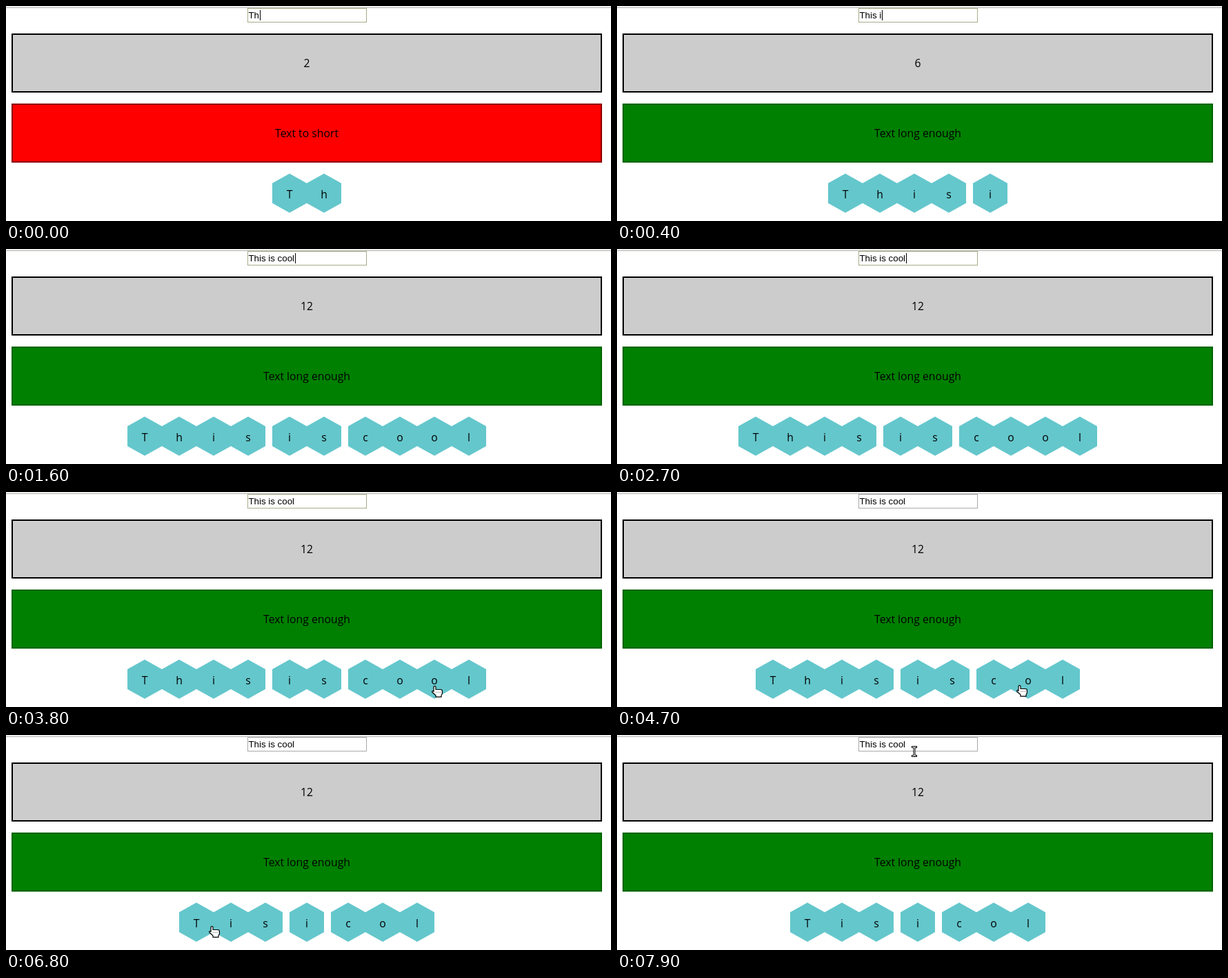
These frames come from a looping animation (877x313 px, 8000 ms). An HTML page with a canvas:

```html
<!DOCTYPE html>
<html lang="en">
<head>
<meta charset="utf-8">
<title>Text length and hexagons</title>
<style>
  html, body { margin: 0; width: 100%; height: 100%; overflow: hidden; background: #fff; }
  canvas { display: block; }
</style>
</head>
<body>
<canvas id="stage" width="877" height="313"></canvas>
<script>
const ctx = document.getElementById('stage').getContext('2d');
const LOOP = 8000, STEP = 100, MIDDLE = 436;
const HEX = { width: 50, top: 244, height: 57, cap: 14 };
const LABEL_FONT = '15.75px "Open Sans", "Noto Sans", sans-serif';
const INPUT_FONT = '13.333px "Liberation Sans", Arial, sans-serif';
const PHRASE = 'This is cool';
const TYPED = 1600, BLUR = 4300;
const CLICKS = [4400, 5500, 6800];

const ENTRY = { x: 755, y: 303 };
const easeOut = p => 1 - (1 - p) ** 2;
const easeInOut = p => p * p * (3 - 2 * p);
const MOVES = [
  { start: 3400, end: 3800, x: 622, y: 282, ease: easeOut },
  { start: 4500, end: 5100, x: 477, y: 280, ease: easeInOut },
  { start: 5500, end: 6300, x: 299, y: 278, ease: easeInOut },
  { start: 7200, end: 7900, x: 431, y: 24, ease: easeInOut },
];

// A fast first burst, then one character every 200 ms
const typedCount = t => Math.min(PHRASE.length, Math.floor(Math.min(2 + t / 50, 4 + t / 200)));

const caretShown = t => t < BLUR && (t < TYPED || (t + 200) % 1200 >= 500);

function pointerAt(t) {
  let { x, y } = ENTRY;
  for (const move of MOVES) {
    if (t < move.start) break;
    const p = move.ease(Math.min(1, (t - move.start) / (move.end - move.start)));
    x += (move.x - x) * p;
    y += (move.y - y) * p;
  }
  return { x: Math.round(x), y: Math.round(y) };
}

function layout(text) {
  const width = c => c === ' ' ? 10 : HEX.width;
  let x = MIDDLE - [...text].reduce((sum, c) => sum + width(c), 0) / 2;
  const cells = [...text].map((c, index) => {
    const cell = { c, index, x: x + HEX.width / 2 };
    x += width(c);
    return cell;
  });
  return cells.filter(cell => cell.c !== ' ');
}

function cellUnder(spot, cells) {
  return cells.find(cell => {
    const dx = Math.abs(spot.x - cell.x) / (HEX.width / 2);
    const dy = Math.abs(spot.y - HEX.top - HEX.height / 2);
    return dx <= 1 && dy <= HEX.height / 2 - dx * HEX.cap;
  });
}

// Each click removes the letter under the pointer
function rowAt(t) {
  let row = PHRASE.slice(0, typedCount(t));
  for (const click of CLICKS.filter(time => time <= t)) {
    const hit = cellUnder(pointerAt(click), layout(row));
    if (hit) row = row.slice(0, hit.index) + row.slice(hit.index + 1);
  }
  return row;
}

function rect(x, y, w, h, color) {
  ctx.fillStyle = color;
  ctx.fillRect(x, y, w, h);
}

function label(text, x, y) {
  ctx.font = LABEL_FONT;
  ctx.textAlign = 'center';
  ctx.fillStyle = '#000';
  ctx.fillText(text, x, y);
}

function panel(y, fill, border, text) {
  rect(8, y, 856, 86, border);
  rect(10, y + 2, 852, 82, fill);
  label(text, MIDDLE, y + 49);
}

function input(text, focused, caret) {
  rect(350, 3, 173, 21, focused ? '#a3ad86' : '#a9a9a9');
  rect(351, 4, 171, 19, '#fff');
  ctx.font = INPUT_FONT;
  ctx.textAlign = 'left';
  ctx.fillStyle = '#000';
  ctx.fillText(text, 351.4, 18);
  if (caret) rect(Math.round(352 + ctx.measureText(text).width), 6, 1, 15, '#000');
}

function hexagon({ c, x }) {
  const { top, height, cap } = HEX;
  const half = HEX.width / 2, bottom = top + height;
  ctx.fillStyle = '#64c7cc';
  ctx.beginPath();
  ctx.moveTo(x, top);
  ctx.lineTo(x + half, top + cap);
  ctx.lineTo(x + half, bottom - cap);
  ctx.lineTo(x, bottom);
  ctx.lineTo(x - half, bottom - cap);
  ctx.lineTo(x - half, top + cap);
  ctx.fill();
  label(c, x, 280);
}

const HAND = new Path2D('M3 2Q3 .6 4.5 .6T6 2V5.5H13Q15.4 5.5 15.4 8V11.5L14 14V16.4H6V14L.8 9.5Q.2 7.5 2 7.5L3 8.5Z');
const ARROW = new Path2D('M.5.5V15.5L4 12.2L6.4 17.8L9 16.7L6.6 11.2H11.4Z');
const BEAM = new Path2D('M-2.5-6.5H-1Q0-6.5 0-5.5Q0-6.5 1-6.5H2.5M0-5.5V5.5Q0 6.5-1 6.5H-2.5M0 5.5Q0 6.5 1 6.5H2.5');

function stroke(path, color, width) {
  ctx.strokeStyle = color;
  ctx.lineWidth = width;
  ctx.stroke(path);
}

function outlined(path) {
  ctx.fillStyle = '#fff';
  ctx.fill(path);
  stroke(path, '#000', 1.2);
}

function pointer({ x, y }, cells) {
  const inside = (l, t, r, b) => x >= l && x <= r && y >= t && y <= b;
  const onText = inside(350, 3, 523, 24) || inside(373, 175, 499, 196) || inside(427, 73, 445, 94);
  ctx.save();
  ctx.lineJoin = 'round';
  ctx.translate(x, y);
  if (cellUnder({ x, y }, cells)) {
    ctx.translate(-5, 0);
    outlined(HAND);
    for (let dx = 6; dx <= 12; dx += 2) rect(dx, 9, 1, 1, '#777');
  } else if (onText) {
    ctx.lineCap = 'square';
    stroke(BEAM, '#000', 3);
    stroke(BEAM, '#fff', 1);
  } else {
    outlined(ARROW);
  }
  ctx.restore();
}

function draw(t) {
  const count = typedCount(t);
  const cells = layout(rowAt(t));

  rect(0, 0, 877, 313, '#fff');
  rect(0, 0, 877, 2, '#f2f1f0');
  rect(0, 2, 877, 1, '#b8b6b4');
  input(PHRASE.slice(0, count), t < BLUR, caretShown(t));
  panel(40, '#ccc', '#000', count);
  if (count > 5) panel(142, '#008000', '#006400', 'Text long enough');
  else panel(142, '#f00', '#8b0000', 'Text to short');
  cells.forEach(hexagon);
  if (t >= MOVES[0].start) pointer(pointerAt(t), cells);
}

const start = performance.now();
function tick() {
  const t = (performance.now() - start) % LOOP;
  draw(Math.floor(t / STEP) * STEP);
  requestAnimationFrame(tick);
}
tick();
</script>
</body>
</html>
```
